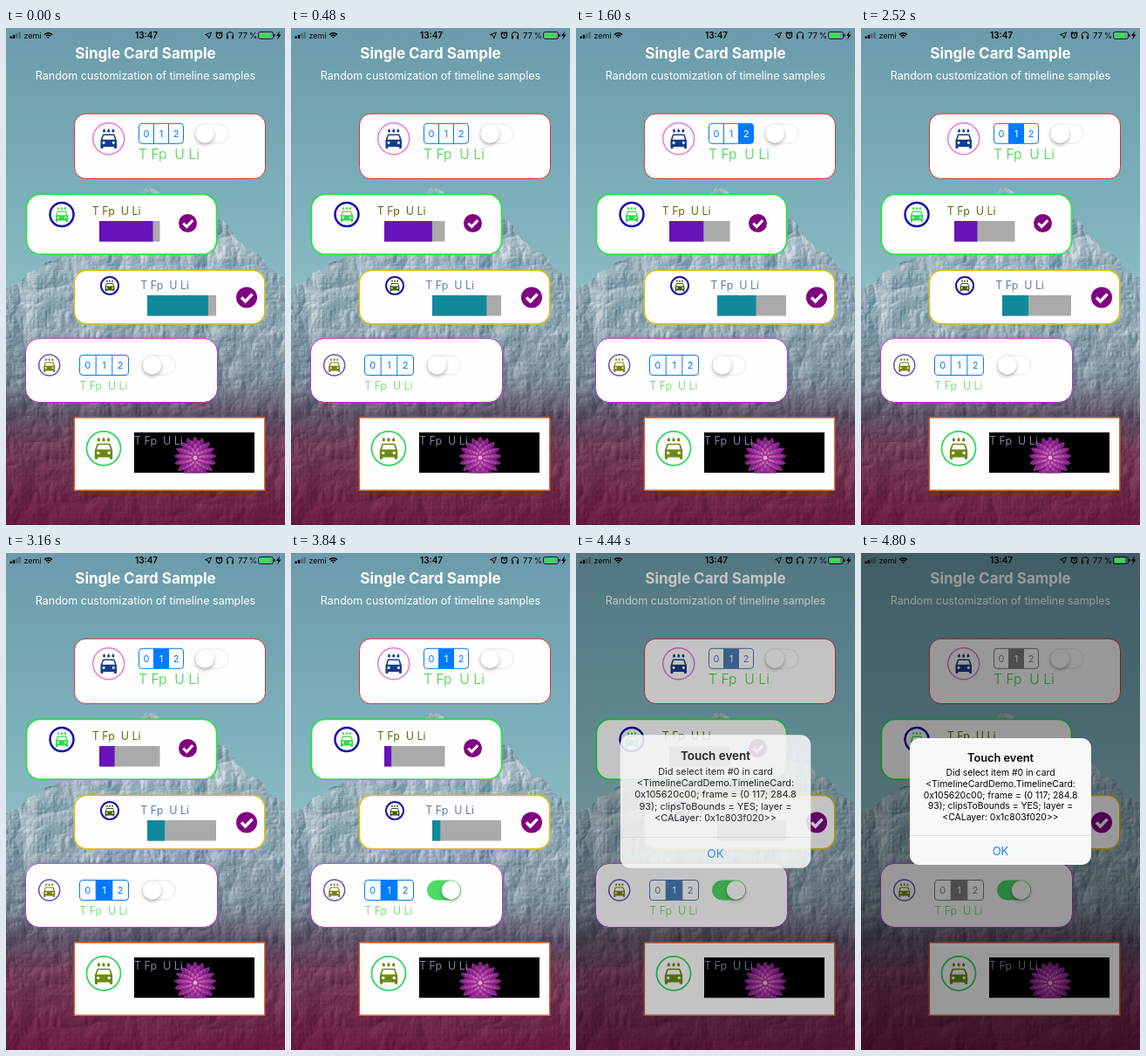
These frames come from a looping animation (320 px wide and 569 px high, 4840 ms). An HTML page with a canvas:

```html
<!DOCTYPE html>
<html lang="en">
<head>
<meta charset="utf-8">
<title>Single Card Sample</title>
<style>
html, body { margin: 0; width: 100%; height: 100%; overflow: hidden; background: #6c9cac; }
canvas { display: block; }
</style>
</head>
<body>
<canvas id="stage" width="320" height="569"></canvas>
<script>
const W = 320, H = 569, LOOP = 4840, STEP = 40;
const BLUE = [0, 122, 255], GREY = [128, 128, 128];
const ctx = document.getElementById('stage').getContext('2d');

const clamp = v => Math.max(0, Math.min(1, v));
const ease = (t, start, length) => 1 - (1 - clamp((t - start) / length)) ** 3;
const blend = (a, b, k) => a.map((v, i) => v + (b[i] - v) * k);
const mix = (a, b, k) => `rgb(${blend(a, b, k).map(Math.round).join()})`;

function gradient(g, y0, y1, colors) {
  const fill = g.createLinearGradient(0, y0, 0, y1);
  colors.forEach((c, i) => fill.addColorStop(i / (colors.length - 1), c));
  return fill;
}

function box(x, y, w, h, r, fill, stroke, line = 1) {
  ctx.beginPath();
  ctx.roundRect(x, y, w, h, r);
  if (fill) { ctx.fillStyle = fill; ctx.fill(); }
  if (stroke) { ctx.strokeStyle = stroke; ctx.lineWidth = line; ctx.stroke(); }
}

function disc(x, y, r, fill, stroke, line) {
  ctx.beginPath();
  ctx.arc(x, y, r, 0, Math.PI * 2);
  if (fill) { ctx.fillStyle = fill; ctx.fill(); }
  if (stroke) { ctx.strokeStyle = stroke; ctx.lineWidth = line; ctx.stroke(); }
}

function line(points, color, width) {
  ctx.beginPath();
  points.forEach(([x, y]) => ctx.lineTo(x, y));
  ctx.strokeStyle = color;
  ctx.lineWidth = width;
  ctx.stroke();
}

function label(text, x, y, size, color, weight = 400, align = 'left') {
  ctx.font = `${weight} ${size}px Inter, sans-serif`;
  ctx.textAlign = align;
  ctx.fillStyle = color;
  ctx.fillText(text, x, y);
}

// Scenery: a lit noise relief below a ridge line, coloured by height.

const RIDGE = [[0, 298], [25, 284], [48, 268], [78, 257], [110, 230], [140, 198], [160, 181],
  [180, 192], [222, 203], [242, 214], [258, 233], [280, 255], [320, 287]];
const SHADE = [[180, 78, 122, 140], [330, 74, 112, 132], [400, 62, 86, 104], [440, 56, 52, 72],
  [480, 76, 32, 62], [569, 82, 14, 48]];
const LIT = [[180, 222, 230, 234], [330, 212, 221, 227], [400, 176, 188, 198], [440, 124, 108, 128],
  [480, 146, 84, 110], [569, 122, 38, 76]];

// Interpolates rows of [position, ...values].
function ramp(rows, at) {
  const i = Math.max(1, rows.findIndex(row => row[0] >= at));
  const [p, ...a] = rows[i - 1], [q, ...b] = rows[i];
  return blend(a, b, clamp((at - p) / (q - p)));
}

function hash(i, j) {
  const v = Math.sin(i * 127.1 + j * 311.7) * 43758.5453;
  return v - Math.floor(v);
}

function noise(x, y) {
  const i = Math.floor(x), j = Math.floor(y);
  const smooth = v => v * v * (3 - 2 * v);
  const u = smooth(x - i), v = smooth(y - j);
  const top = hash(i, j) * (1 - u) + hash(i + 1, j) * u;
  const low = hash(i, j + 1) * (1 - u) + hash(i + 1, j + 1) * u;
  return top * (1 - v) + low * v;
}

function relief(x, y) {
  let sum = 0;
  for (let k = 0, f = 1; k < 5; k++, f *= 2) {
    sum += (1 - Math.abs(2 * noise(x / 36 * f, y / 44 * f) - 1)) / f;
  }
  return sum;
}

function paintScenery() {
  const canvas = document.createElement('canvas');
  canvas.width = W;
  canvas.height = H;
  const g = canvas.getContext('2d');
  g.fillStyle = gradient(g, 0, 290, ['#6c9bab', '#72a5b2', '#7bafba', '#8abac3']);
  g.fillRect(0, 0, W, H);

  const image = g.getImageData(0, 0, W, H);
  for (let x = 0; x < W; x++) {
    const top = Math.round(ramp(RIDGE, x)[0] + 8 * (noise(x / 6, 3) - 0.5));
    for (let y = top; y < H; y++) {
      const light = clamp(0.55 + 2.2 * (relief(x, y) - relief(x + 1.5, y + 1)));
      image.data.set(blend(ramp(SHADE, y), ramp(LIT, y), light), (y * W + x) * 4);
    }
  }
  g.putImageData(image, 0, 0);
  return canvas;
}

// Widgets

const drop = x => `M${x} .8s-1.5 1.7-1.5 2.7a1.5 1.5 0 0 0 3 0c0-1-1.5-2.7-1.5-2.7z`;
const lamp = x => `M${x} 16.5a1.5 1.5 0 1 0 3 0a1.5 1.5 0 1 0-3 0z`;
const carPath = new Path2D([7, 12, 17].map(drop).join('') +
  'M5.1 8Q5.5 7 6.5 7h11q1 0 1.4 1L21 14v8q0 1-1 1h-1q-1 0-1-1v-1H6v1q0 1-1 1H4q-1 0-1-1v-8z' +
  'M5 13h14l-1.5-4.5h-11z' + lamp(5) + lamp(16));

function carBadge(x, y, r, ring, width, color, scale) {
  disc(x, y, r, null, ring, width);
  ctx.save();
  ctx.translate(x, y);
  ctx.scale(scale, scale);
  ctx.translate(-12, -12);
  ctx.fillStyle = color;
  ctx.fill(carPath, 'evenodd');
  ctx.restore();
}

function checkBadge(x, y, r) {
  disc(x, y, r, '#800080');
  line([[x - r * 0.5, y], [x - r * 0.12, y + r * 0.38], [x + r * 0.55, y - r * 0.32]], '#fff', r * 0.29);
}

function progress(x, y, w, value, color) {
  ctx.fillStyle = '#aaa';
  ctx.fillRect(x, y, w, 23.5);
  ctx.fillStyle = color;
  ctx.fillRect(x, y, w * value, 23.5);
}

function segments(x, y, w, selected, pressed, tint) {
  const h = 23, cell = w / 3;
  ctx.save();
  ctx.beginPath();
  ctx.roundRect(x, y, w, h, 3.5);
  ctx.clip();
  ctx.fillStyle = tint;
  if (selected >= 0) ctx.fillRect(x + cell * selected, y, cell, h);
  if (pressed >= 0 && pressed !== selected) {
    ctx.globalAlpha = 0.16;
    ctx.fillRect(x + cell * pressed, y, cell, h);
  }
  ctx.restore();
  box(x, y, w, h, 3.5, null, tint);
  for (let i = 0; i < 3; i++) {
    if (i) line([[x + cell * i, y], [x + cell * i, y + h]], tint, 1);
    label(i, x + cell * (i + 0.5), y + 15.4, 11, i === selected ? '#fff' : tint, 400, 'center');
  }
}

function toggle(x, y, on) {
  box(x + 0.5, y + 0.5, 38, 22, 11, mix([255, 255, 255], [76, 217, 100], on),
    mix([229, 229, 229], [76, 217, 100], on));
  ctx.save();
  ctx.shadowColor = 'rgba(0,0,0,.3)';
  ctx.shadowBlur = 4;
  ctx.shadowOffsetY = 2;
  disc(x + 11.5 + on * 16, y + 11.5, 10.7, '#fff');
  ctx.restore();
}

function flower(x, y, w, h) {
  ctx.save();
  ctx.beginPath();
  ctx.rect(x, y, w, h);
  ctx.clip();
  ctx.fillStyle = '#000';
  ctx.fillRect(x, y, w, h);
  ctx.translate(x + 70, y + 29);
  const rings = [[24.5, '#54125c', '#9a2b98'], [20.5, '#6a1a70', '#b23bac'], [16.5, '#84277f', '#c84dbd'],
    [12, '#a13796', '#dc66ca'], [8, '#b8489f', '#ee8ada']];
  rings.forEach(([r, inner, outer], k) => {
    const count = 17 - k * 2;
    for (let i = 0; i < count; i++) {
      ctx.save();
      ctx.rotate((i + k * 0.5) * Math.PI * 2 / count);
      ctx.fillStyle = gradient(ctx, 0, -r, ['#2c0836', inner, outer]);
      ctx.beginPath();
      ctx.moveTo(0, 0);
      ctx.quadraticCurveTo(-r * 0.3, -r * 0.7, 0, -r);
      ctx.quadraticCurveTo(r * 0.3, -r * 0.7, 0, 0);
      ctx.fill();
      ctx.restore();
    }
  });
  disc(0, 0, 2.5, '#f0a0dc');
  ctx.restore();
}

function statusBar() {
  const ink = '#050505';
  for (let i = 0; i < 4; i++) {
    const h = 2.5 + i * 1.7;
    box(4.5 + i * 3.3, 12 - h, 2.4, h, 0.6, i < 2 ? ink : 'rgba(0,0,0,.3)');
  }
  label('zemi', 20.5, 12, 9, ink);
  for (let r = 1.2; r < 7; r += 2.5) {
    ctx.beginPath();
    ctx.arc(48.5, 12, r, -Math.PI * 0.75, -Math.PI * 0.25);
    ctx.strokeStyle = ink;
    ctx.lineWidth = 1.6;
    ctx.stroke();
  }
  label('13:47', 161, 12, 10, ink, 600, 'center');

  ctx.lineWidth = 0.9;
  ctx.stroke(new Path2D('M235.5 5l-2.8 7-1-3.4-3.2-1z'));
  disc(244.5, 8.5, 3.1, null, ink, 1.2);
  line([[244.5, 6.5], [244.5, 8.7], [246, 8.7]], ink, 0.8);
  line([[240.6, 6.4], [242.6, 4.4]], ink, 1.2);
  line([[246.4, 4.4], [248.4, 6.4]], ink, 1.2);
  ctx.beginPath();
  ctx.arc(257, 8.5, 3.8, Math.PI, 0);
  ctx.lineWidth = 1.1;
  ctx.stroke();
  box(253, 8.5, 2, 4, 0.8, ink);
  box(259, 8.5, 2, 4, 0.8, ink);

  label('77\u2009%', 266, 12, 9.6, ink);
  box(289.5, 4.5, 17, 8, 2, null, ink, 0.8);
  box(290.8, 5.8, 12, 5.4, 0.8, '#3bdc52');
  box(307.4, 7, 1.2, 3, 0.5, ink);
  ctx.fillStyle = ink;
  ctx.fill(new Path2D('M314 3.5l-4 5.5h2.4l-1.2 4.5 4.3-6h-2.5z'));
}

// Screen

const SAMPLE = 'T Fp\u00a0 U Li';
const MESSAGE = [
  'Did select item #0 in card',
  '<TimelineCardDemo.TimelineCard:',
  '0x105620c00; frame = (0 117; 284.8',
  '93); clipsToBounds = YES; layer =',
  '<CALayer: 0x1c803f020>>'
];

function cards(t, dim) {
  const tint = mix(BLUE, GREY, dim);
  const left = clamp(0.885 - t / 5000);
  const white = '#fffdfe';

  const topPick = t < 1120 ? -1 : t < 2000 ? 2 : 1;
  const topPress = t >= 920 && t < 1120 ? 2 : t >= 1880 && t < 2000 ? 1 : -1;
  box(78.5, 98.2, 219, 74.3, 13, white, '#d4382f');
  carBadge(117.7, 126.7, 18, '#e87ad6', 1.5, '#193c88', 1.03);
  segments(152.5, 109.3, 51, topPick, topPress, tint);
  toggle(216.5, 109.5, 0);
  label(SAMPLE, 152, 150, 15.7, '#36d83c', 300);

  box(23.4, 190.4, 218.2, 68.8, 16, white, '#22e43c', 1.7);
  carBadge(64, 213.5, 13.5, '#150fa8', 2.5, '#2edc4a', 0.78);
  label(SAMPLE, 98.7, 214, 12.4, '#6b6a12');
  progress(107, 221, 69.5, left, '#6813bb');
  checkBadge(208.5, 223.5, 10.5);

  box(78.4, 277.4, 218.4, 61.4, 14, white, '#d3bf1f', 1.7);
  carBadge(119, 295, 10, '#1a10a6', 2, '#3c5c12', 0.6);
  label(SAMPLE, 154.3, 299, 12.4, '#5f7fab');
  progress(162, 306, 79, left, '#11899d');
  checkBadge(276, 308.5, 12);

  const lowPress = t >= 2840 && t < 2960 ? 1 : -1;
  box(22.5, 355.3, 220, 73.2, 16, white, '#b13cc4');
  carBadge(49.7, 386, 12, '#5d54bf', 1.5, '#7a8214', 0.72);
  segments(84.5, 374.5, 56, t < 2960 ? -1 : 1, lowPress, tint);
  toggle(156, 374.5, ease(t, 3440, 280));
  label(SAMPLE, 84.3, 413.5, 12.4, '#52dc58', 300);

  box(78.4, 446, 218.4, 83.2, 0, white, '#cb6534', 1.5);
  carBadge(112, 481.3, 19.5, '#2fd660', 1.8, '#6b8a13', 1.13);
  flower(147, 463, 138, 46.5);
  label(SAMPLE, 147, 477, 12.4, '#7c86a6');
}

function alertBox(shown) {
  const scale = 1.12 - 0.12 * shown;
  ctx.save();
  ctx.globalAlpha = clamp(shown * 1.5);
  ctx.translate(160, 284.5);
  ctx.scale(scale, scale);
  ctx.translate(-160, -284.5);
  box(56, 212, 208, 145, 11, '#f7f8f8');
  label('Touch event', 160, 239, 12.8, '#050505', 600, 'center');
  MESSAGE.forEach((text, i) => label(text, 160, 255.3 + i * 12.6, 10.4, '#050505', 400, 'center'));
  line([[56, 323.5], [264, 323.5]], '#d2d2d4', 0.7);
  label('OK', 160, 345.5, 13, '#1580fa', 400, 'center');
  ctx.restore();
}

const scenery = paintScenery();

function draw(t) {
  const shown = ease(t, 4340, 400);
  ctx.drawImage(scenery, 0, 0);
  label('Single Card Sample', 160, 35, 17, '#fff', 700, 'center');
  label('Random customization of timeline samples', 160, 59, 12.5, '#fff', 400, 'center');
  cards(t, shown);
  if (shown > 0) {
    ctx.fillStyle = `rgba(0,0,0,${0.4 * shown})`;
    ctx.fillRect(0, 0, W, H);
    alertBox(shown);
  }
  statusBar();
}

function tick() {
  const t = performance.now() % LOOP;
  draw(Math.floor(t / STEP) * STEP);
  requestAnimationFrame(tick);
}
tick();
</script>
</body>
</html>
```
